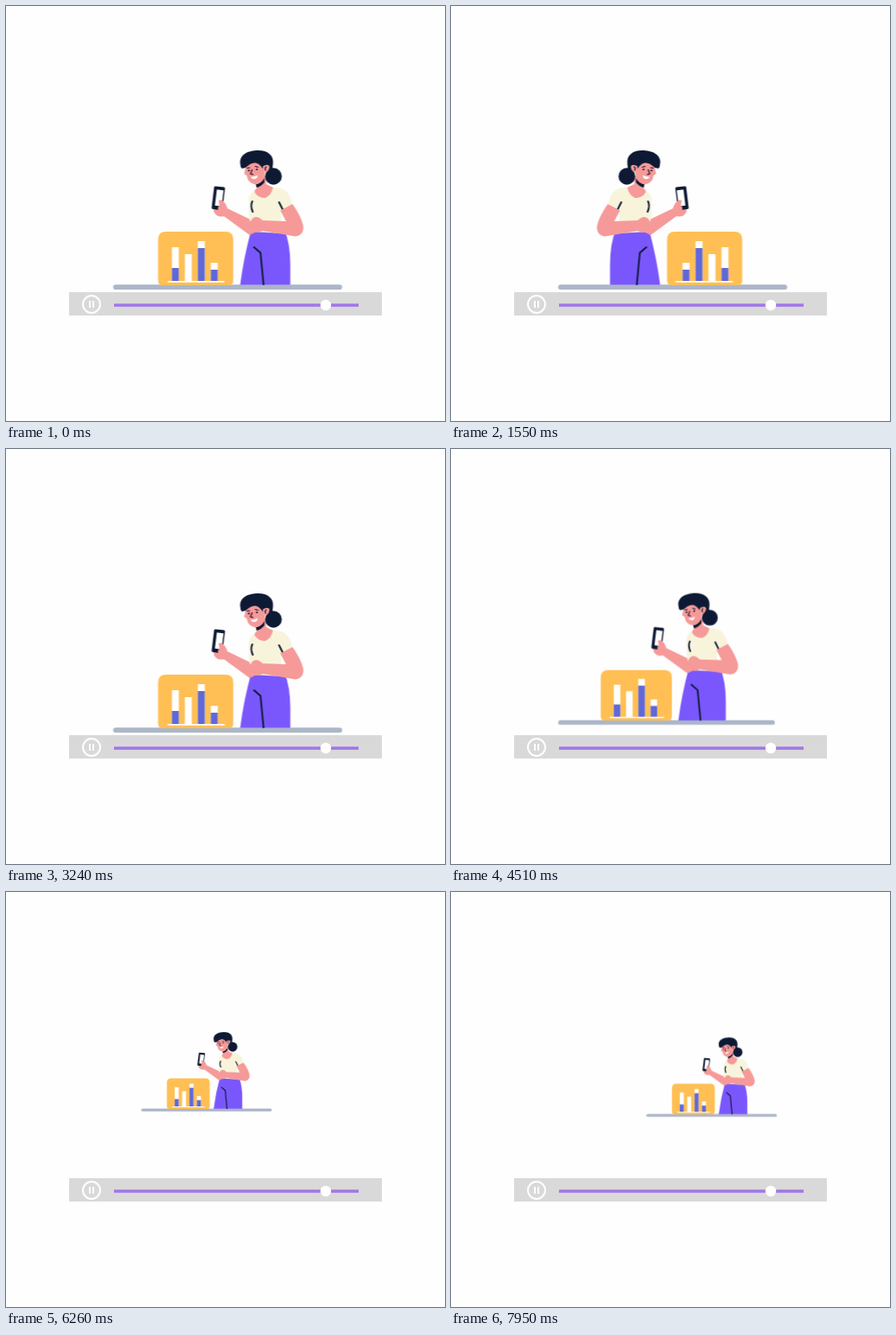
An HTML page that plays this animation: 508x480 px, repeating every 8 s.

```html
<!DOCTYPE html>
<html lang="en">
<head>
<meta charset="utf-8">
<title>Presenter at a desk</title>
<style>
  html, body { margin: 0; width: 100%; height: 100%; overflow: hidden; background: #fefefe; }
  svg { display: block; width: 100vw; height: 100vh; }
  .skin { fill: #f59a98; }
  .dark { fill: #0e1a34; }
  .cream { fill: #f8f4dc; }
  .blue { fill: #5f68d8; }
  .white { fill: #fff; }
  .line { fill: none; stroke: #0e1a34; stroke-width: 2; stroke-linecap: round; stroke-linejoin: round; }
</style>
</head>
<body>
<svg viewBox="0 0 508 480">
  <g id="player">
    <rect x="73" y="331" width="362" height="27" fill="#d9d9d9"/>
    <circle cx="99" cy="345" r="10" fill="none" stroke="#fff" stroke-width="2"/>
    <path class="white" d="M96 341h2v8h-2zM100 341h2v8h-2z"/>
    <rect x="125" y="344.3" width="283" height="3.5" fill="#a276e8"/>
    <circle class="white" cx="370" cy="346" r="6.2"/>
  </g>

  <!-- Origin: middle of the desk's lower edge -->
  <g id="scene"><g transform="translate(-256.5 -328)">
    <rect x="124" y="322.3" width="265" height="5.7" rx="2.8" fill="#abb6c8"/>

    <g id="chart">
      <path fill="#ffbf54" d="M185 261H254Q263 261 263 270V317Q263 323 258 323H181Q176 323 176 317V270Q176 261 185 261Z"/>
      <path class="white" d="M192 279h8v39h-8zM207 287h8v31h-8zM222 272h8v46h-8zM237 297h8v21h-8zM187 318h66v1.8h-66z"/>
      <path class="blue" d="M192 303h8v15h-8zM222 280h8v38h-8zM237 305h8v13h-8z"/>
    </g>

    <g id="woman">
      <!-- trousers -->
      <path fill="#7a57fc" d="M284 258H322Q329 275 329 299V322.5H271Q275 291 284 258Z"/>
      <path class="line" d="M287 279L294.5 285.5L298 322"/>

      <!-- far arm with phone -->
      <path class="skin" d="M283 247L256 234Q254 226 249 225L240 229Q239 234 241 239Q245 245 252 243L282 265L288 262Z"/>
      <path class="dark" d="M242.3 208.5L252.5 209.6Q253.6 210 253.4 211.5L250.4 235Q250 236.7 248.5 236.3L239 234.8Q237.7 234.4 238 233L240.8 209.8Q241 208.4 242.3 208.5Z"/>
      <path class="white" d="M244 212.2L251.7 213.3L249.4 231.8L241.7 230.8Z"/>
      <path class="skin" d="M246 225Q250 223 252 227L256 233L252 239L246 237Q244 233 247 231Z"/>

      <!-- shirt -->
      <path class="cream" d="M289 212Q283 216 281 222L281 243L285 261L319 263L318 237L331.5 229Q328 214 319 211L305 209Z"/>
      <path class="line" d="M285 226Q282.5 231 285.5 238M316 227L320 235"/>

      <!-- near arm -->
      <path class="skin" d="M317.5 236.5L331.5 229Q341 242 344 254Q345 265 335 266.5L297 260Q289 264 284 260L279 254Q282 251 285 246Q290 241 297 248L324 249Z"/>

      <!-- neck and head -->
      <path class="skin" d="M291 202L290 211Q287 213 288 216Q292 222 300 222Q307 219 309 210L301 206V196Z"/>
      <path class="dark" d="M289 206Q295 206 299 199L299 204Q295 209 290 210Z"/>
      <circle class="dark" cx="309.5" cy="197" r="9.7"/>
      <path class="dark" d="M271 182C270 172 280 167 292 167C303 167 310 173 309 182L308 191H298L281 186L273 188Q271 186 271 182Z"/>
      <path class="skin" d="M277 184Q285 182 289 181Q295 182 298 185Q304 182 305 186Q304 192 300 192Q299 203 291 206Q284 207 280 201L278.5 196L275.5 194Q277 190 277 184Z"/>
      <path class="dark" d="M272 184Q274 177 283 176Q294 176 298 183L297 188Q292 180 285 181L277 187Z"/>
      <path class="line" stroke-width="1" style="stroke-width:1.1" d="M279 187.5L282 187M288.5 185.5L291.5 186.5M301 186Q299 188 300.5 190"/>
      <circle class="dark" cx="281" cy="190.3" r="1.1"/>
      <circle class="dark" cx="290.3" cy="189" r="1.1"/>
      <path d="M285 189L283 194L286 195" fill="none" stroke="#5a2338" stroke-width="1.5"/>
      <path class="white" d="M283 197.5Q288 198 291 195.5Q291 200 287 200.3Q284 200 283 197.5Z"/>
    </g>
  </g></g>
</svg>
<script>
  const LOOP = 8000, STEP = 60, STEPS = 8;

  // Each pose: x, y, scale x, scale y
  const home = [256.5, 328, 1, 1];
  const flipped = [256.5, 328, -1, 1];
  const small = [199.5, 256, 0.57, 0.57];
  const right = [329.5, 247, 0.57, 0.57];
  const back = [217.5, 299, 0.57, 0.57];

  const moves = [
    [1130, home, flipped],
    [2820, flipped, home],
    [4510, home, small],
    [6200, small, right],
    [7890, right, back]
  ];

  const mix = (a, b, p) => a.map((v, i) => v + (b[i] - v) * p);
  const toFrame = (time, [x, y, sx, sy]) => ({
    offset: time / LOOP,
    easing: 'step-end',
    transform: `translate(${x}px, ${y}px) scale(${sx}, ${sy})`
  });

  const frames = [toFrame(0, home)];
  for (const [start, from, to] of moves) {
    for (let k = 1; k <= STEPS; k++) {
      const time = start + (k - 1) * STEP;
      if (time < LOOP) frames.push(toFrame(time, mix(from, to, k / STEPS)));
    }
  }
  frames.push({ ...frames[frames.length - 1], offset: 1 });

  document.getElementById('scene').animate(frames, { duration: LOOP, iterations: Infinity });
</script>
</body>
</html>
```
